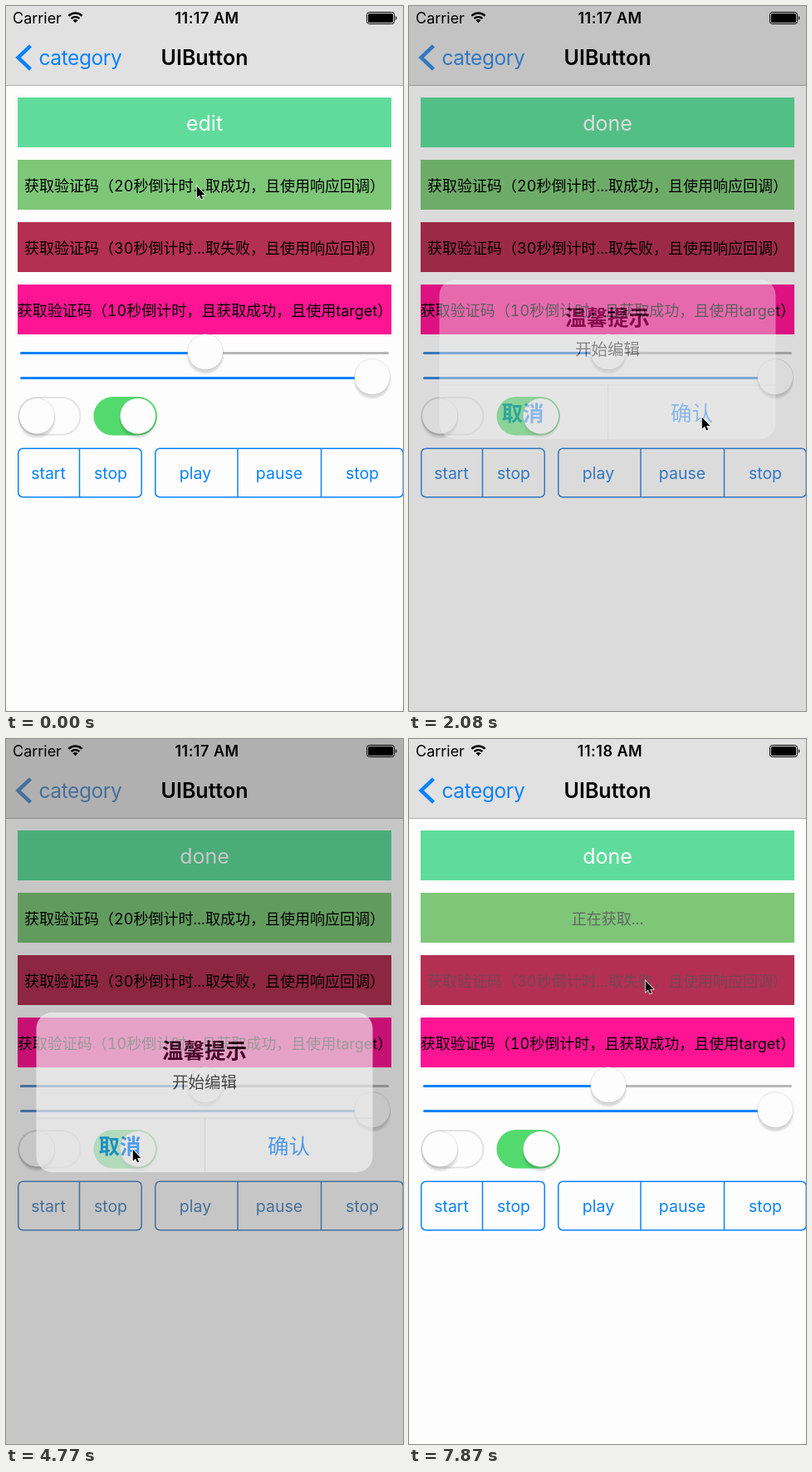
These frames come from a looping animation (478 px wide and 848 px high, 8 s). An HTML page:

```html
<!DOCTYPE html>
<html lang="zh-CN">
<head>
<meta charset="utf-8">
<title>Buttons</title>
<style>
  html, body { margin: 0; width: 100%; height: 100%; overflow: hidden; background: #fdfdfd; }
  svg { display: block; width: 100vw; height: 100vh; }
  text { font: 18px Inter, "Noto Sans CJK SC", "Noto Sans CJK", sans-serif; text-anchor: middle; text-spacing-trim: space-all; }
  .start { text-anchor: start; }
  .label { font-variant-numeric: tabular-nums; }
  .large { font-size: 25px; }
  .title { font-size: 25px; font-weight: 600; }
  .back { font-size: 24.5px; letter-spacing: -.4px; }
  .clock { font-weight: 600; letter-spacing: .5px; }
  .segment { font-size: 19.5px; }
  .alert { font-size: 25.5px; }
  .message { font-size: 19.5px; }
  .bold { font-weight: 600; }
  .tint { fill: var(--tint); }
  .tint-line { fill: none; stroke: var(--tint); stroke-width: 1.5; }
  .chevron { stroke-width: 4.5; }
</style>
</head>
<body>
<svg viewBox="0 0 478 848" preserveAspectRatio="none">
  <defs>
    <filter id="blur" x="-50%" y="-50%" width="200%" height="200%"><feGaussianBlur stdDeviation="1.1"/></filter>
    <g id="thumb">
      <circle cy="4.5" r="21.5" opacity=".14" filter="url(#blur)"/>
      <circle r="21.5" fill="#fdfdfd" stroke="#000" stroke-opacity=".14" stroke-width=".8"/>
    </g>
  </defs>

  <g id="page">
    <rect width="478" height="848" fill="#fdfdfd"/>
    <rect width="478" height="95" fill="#e1e1e1"/>
    <rect y="95" width="478" height="1" fill="#b0b0b0"/>

    <text class="start" x="8" y="21">Carrier</text>
    <g fill="none" stroke="#000" stroke-width="2.4">
      <path d="M75.4 11.9a11.5 11.5 0 0 1 16.2 0M78.6 15.1a7 7 0 0 1 9.8 0"/>
      <path d="M83.5 20.2l-3-3a4.2 4.2 0 0 1 6 0z" fill="#000" stroke="none"/>
    </g>
    <text id="clock" class="clock" x="242" y="21"></text>
    <rect x="434.5" y="7.5" width="33" height="14" rx="3" fill="none" stroke="#000"/>
    <rect x="436" y="9" width="30" height="11" rx="1.5"/>
    <path d="M469 12a3 3 0 0 1 0 5z"/>

    <path d="M29.5 47.8L14.6 62L29.5 76.2" class="tint-line chevron"/>
    <text class="back start tint" x="39.5" y="71">category</text>
    <text class="title" x="239" y="71">UIButton</text>

    <rect x="14" y="110" width="450" height="60" fill="#5fdc9b"/>
    <rect x="14" y="185" width="450" height="60" fill="#7ec678"/>
    <rect x="14" y="260" width="450" height="60" fill="#b43052"/>
    <rect x="14" y="335" width="450" height="60" fill="#ff1493"/>
    <text id="toggle" class="large" x="239" y="150" fill="#fff"></text>
    <text id="code20" class="label" x="239" y="222.5"></text>
    <text id="code30" class="label" x="239" y="297.5">获取验证码（30秒倒计时...取失败，且使用响应回调）</text>
    <text class="label" x="239.5" y="372.5">获取验证码（10秒倒计时，且获取成功，且使用target）</text>

    <rect x="17" y="416" width="444" height="3" rx="1.5" fill="#b7b7b7"/>
    <rect x="17" y="416" width="223" height="3" rx="1.5" class="tint"/>
    <rect x="17" y="446" width="424" height="3" rx="1.5" class="tint"/>
    <use href="#thumb" x="240" y="416"/>
    <use href="#thumb" x="441" y="446"/>

    <rect x="15" y="471" width="74.5" height="44.5" rx="22.2" fill="none" stroke="#e3e3e3" stroke-width="2"/>
    <rect x="105.5" y="470" width="76.5" height="46.5" rx="23.2" fill="#53da6e"/>
    <use href="#thumb" x="37.2" y="493.2"/>
    <use href="#thumb" x="158.8" y="493.2"/>

    <rect x="14.75" y="532.25" width="148.5" height="58.5" rx="5.5" class="tint-line"/>
    <rect x="179.75" y="532.25" width="298.5" height="58.5" rx="5.5" class="tint-line"/>
    <path d="M88.5 532v59M279 532v59M379.5 532v59" class="tint-line"/>
    <g class="tint">
      <text class="segment" x="51" y="568.5">start</text>
      <text class="segment" x="126" y="568.5">stop</text>
      <text class="segment" x="228" y="568.5">play</text>
      <text class="segment" x="329" y="568.5">pause</text>
      <text class="segment" x="429" y="568.5">stop</text>
    </g>
  </g>

  <rect id="dim" width="478" height="848"/>

  <g id="alert">
    <rect x="36.5" y="329" width="405" height="192" rx="19" fill="#f7f7f7"/>
    <path id="pressCancel" d="M36.5 456H239.5V521H55.5A19 19 0 0 1 36.5 502z" fill="#e4e4e4"/>
    <path id="pressConfirm" d="M239.5 456H441.5V502A19 19 0 0 1 422.5 521H239.5z" fill="#e4e4e4"/>
    <path d="M36.5 456H441.5M239.5 456V521" stroke="#dcdcde" fill="none"/>
    <text class="alert bold" x="239" y="383.5">温馨提示</text>
    <text class="message" x="239" y="419.5">开始编辑</text>
    <g fill="#0a82ff">
      <text class="alert bold" x="137" y="498.5">取消</text>
      <text class="alert" x="340.5" y="498.5">确认</text>
    </g>
  </g>

  <path id="cursor" d="M.8 .8V14.6L4 11.7L6.1 16.5L8.2 15.6L6.1 10.9H10.4Z" stroke="#fff" stroke-width="1.4" paint-order="stroke"/>
</svg>

<script>
const LOOP = 8000;
const STEP = 148.5; // the screen refreshes in discrete steps; all times below count them

// Places where the pointer rests: it glides from one to the next.
const stops = [
  { arrive: 0, leave: 0, x: 229, y: 216 },
  { arrive: 3, leave: 8, x: 241, y: 143 },
  { arrive: 12, leave: 14, x: 352, y: 494 },
  { arrive: 18, leave: 26, x: 263, y: 133 },
  { arrive: 30, leave: 32, x: 152, y: 493 },
  { arrive: 38, leave: 42, x: 233, y: 215 },
  { arrive: 46, leave: 46, x: 294, y: 394 },
  { arrive: 51, leave: 54, x: 284, y: 290 }
];

const alerts = [
  { show: 4.4, hide: 13, button: "pressConfirm" },
  { show: 24.2, hide: 31.45, button: "pressCancel" }
];

const el = id => document.getElementById(id);
const mix = (a, b, k) => a + (b - a) * k;
const easeOut = k => 1 - (1 - k) ** 2;
const settle = elapsed => Math.exp(-1.1 * elapsed);

function setText(id, value) {
  if (el(id).textContent !== value) el(id).textContent = value;
}

function drawCursor(step) {
  const i = stops.findLastIndex(stop => stop.arrive <= step);
  const from = stops[i], to = stops[i + 1] ?? from;
  const k = step <= from.leave ? 0 : easeOut((step - from.leave) / (to.arrive - from.leave));
  el("cursor").setAttribute("transform", `translate(${mix(from.x, to.x, k)} ${mix(from.y, to.y, k)})`);
}

function drawAlert(step) {
  const current = alerts.findLast(alert => alert.show <= step);
  const hiding = current && step > current.hide;
  let level = 0;
  if (current) level = hiding ? settle(step - current.hide) : 1 - settle(step - current.show);

  const scale = hiding ? 1 : 1 + .1 * (1 - level);
  el("dim").setAttribute("opacity", .4 * level);
  el("alert").setAttribute("opacity", Math.min(.965, 1.15 * level));
  el("alert").setAttribute("transform", `translate(239 425) scale(${scale}) translate(-239 -425)`);
  for (const { hide, button } of alerts) {
    el(button).setAttribute("opacity", step > hide - 1.5 && step <= hide ? 1 : 0);
  }

  // The tint fades to grey while the page is dimmed.
  const tint = [10, 130, 255].map(channel => mix(channel, 153, level));
  el("page").style.setProperty("--tint", `rgb(${tint})`);
}

function draw(time) {
  const step = Math.floor((time % LOOP + 8) / STEP);
  drawCursor(step);
  drawAlert(step);

  const editing = step >= 4 && step < 19 || step >= 25;
  setText("toggle", editing ? "done" : "edit");
  setText("clock", step < 51 ? "11:17 AM" : "11:18 AM");
  setText("code20", step < 39 ? "获取验证码（20秒倒计时...取成功，且使用响应回调）" : "正在获取...");
  el("code20").setAttribute("fill", step < 38 ? "#000" : "#62695f");
  el("code30").setAttribute("fill", step < 53 ? "#000" : "#744654");
}

const origin = performance.now();
function tick() {
  draw(performance.now() - origin);
  requestAnimationFrame(tick);
}
tick();
</script>
</body>
</html>
```
